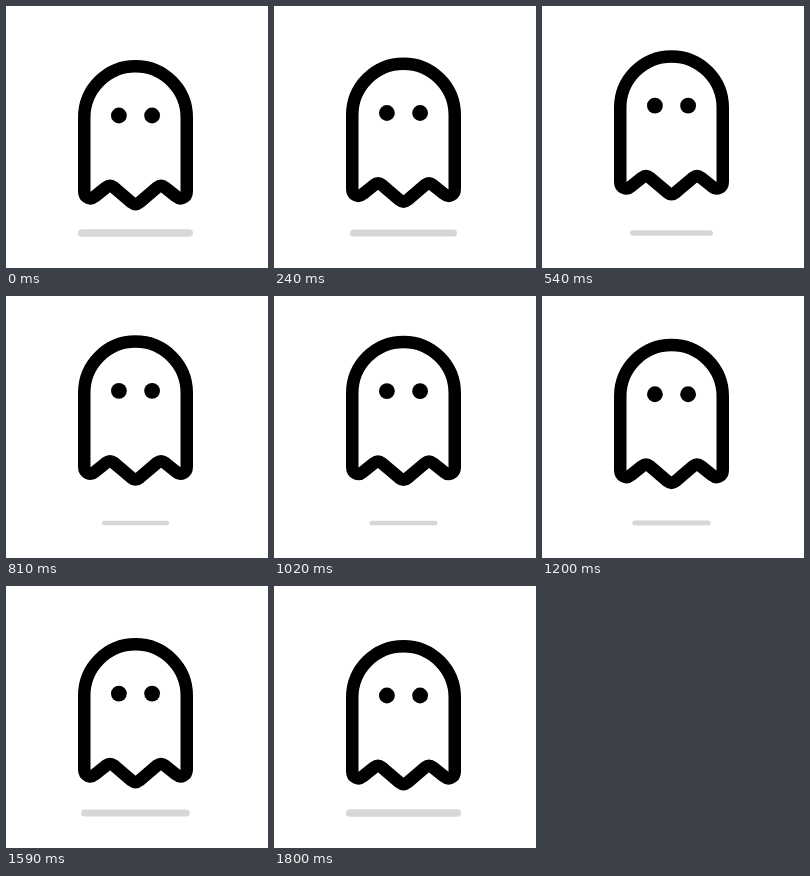
These frames come from a looping animation (262 px wide and 262 px high, 1.83 s). An HTML page:

```html
<!DOCTYPE html>
<html lang="en">
<head>
<meta charset="utf-8">
<title>Floating ghost</title>
<style>
  html, body { margin: 0; width: 100%; height: 100%; overflow: hidden; background: #fff; }
  svg { display: block; width: 100%; height: 100%; }
</style>
</head>
<body>
<svg viewBox="0 0 262 262">
  <g id="ghost">
    <path fill="none" stroke="#000" stroke-width="12.5" stroke-linejoin="round"
      d="M78.25 111.5 a51.25 51.25 0 0 1 102.5 0 V185.5
         c0 6 -6 8.8 -10.5 5 L159 181.5 q-4 -3 -8 0
         L133.5 196.4 q-4 3.2 -8 0
         L108 181.5 q-4 -3 -8 0 L88.75 190.5
         c-4.5 3.8 -10.5 1 -10.5 -5 Z"/>
    <circle cx="112.9" cy="109.5" r="7.9"/>
    <circle cx="146.1" cy="109.5" r="7.9"/>
  </g>
  <rect id="shadow" x="-57.5" y="-3.8" width="115" height="7.6" rx="3.8" fill="#d5d8d7"/>
</svg>
<script>
  const LOOP = 1830, STEP = 30, FLOAT = 1800;
  const ghost = document.getElementById('ghost');
  const shadow = document.getElementById('shadow');
  const start = performance.now();

  function draw() {
    const elapsed = Math.max(0, performance.now() - start) % LOOP;
    const t = Math.floor(elapsed / STEP) * STEP;
    // 0 at rest, 1 at the top of the float
    const lift = (1 - Math.cos(2 * Math.PI * t / FLOAT)) / 2;
    ghost.setAttribute('transform', `translate(0 ${-15 * lift})`);
    shadow.setAttribute('transform', `translate(129.5 227) scale(${1 - 0.426 * lift})`);
    requestAnimationFrame(draw);
  }
  draw();
</script>
</body>
</html>
```
